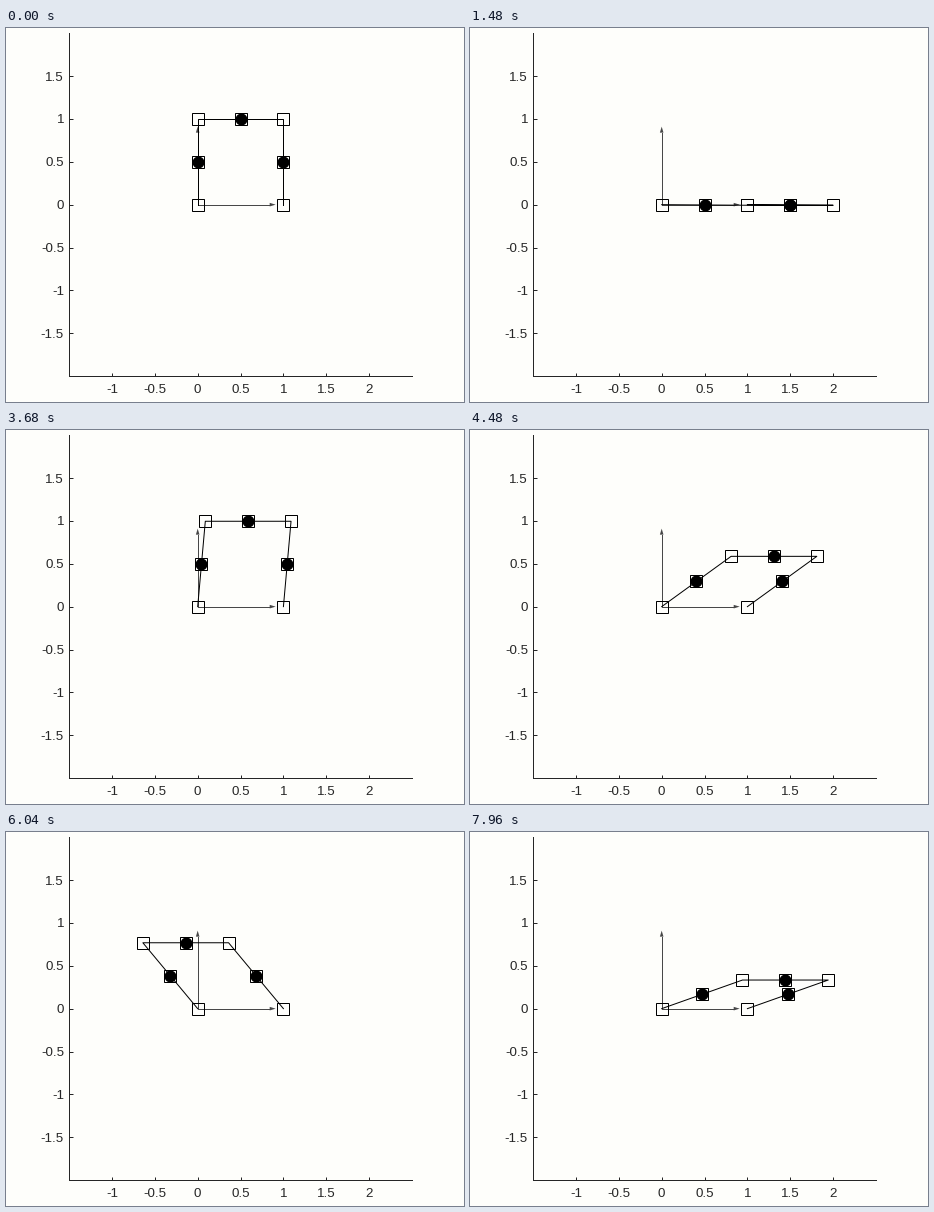
Recreate the animation shown at these times as a matplotlib script. Size 458 by 374 pixels, loop 8 s.

```python
import numpy as np
import matplotlib.pyplot as plt
from matplotlib.animation import FuncAnimation

WIDTH, HEIGHT, DPI = 458, 374, 64
PX = 72 / DPI                      # one pixel in points
FRAMES, INTERVAL = 200, 40
LEFT, RIGHT, TOP, BOTTOM = 63.1, 406, 5.2, 348.1
UNIT = (RIGHT - LEFT) / 4          # pixels per data unit
PAPER, INK, AXIS, ARROW = "#fefefb", "#000000", "#262626", "#484848"
HOLD = 196                         # the picture pauses for one step here

# Pose checkpoints: swing angle in degrees, clockwise from upright
KEY_FRAMES = [7, 37, 65, 92, 131, 173, 199]
KEY_ANGLES = [0, 90.4, 306.9, 365.1, 552.7, 722.7, 790.5]


def swing(duration=16.5, step=0.002, speed=0.3):
    """Inverted pendulum in natural time units, pushed off from the top."""
    times = np.arange(0, duration, step)
    angles = np.zeros_like(times)
    for i in range(1, len(times)):
        half = speed + 0.5 * step * np.sin(angles[i - 1])
        angles[i] = angles[i - 1] + step * half
        speed = half + 0.5 * step * np.sin(angles[i])
    return times, angles


times, angles = swing()
key_times = np.interp(np.radians(KEY_ANGLES), angles, times)


def angle_at(frame):
    if frame == HOLD:
        frame -= 1
    return np.interp(np.interp(frame, KEY_FRAMES, key_times), times, angles)


plt.rcParams["font.family"] = "Liberation Sans"
plt.rcParams["axes.unicode_minus"] = False

fig = plt.figure(figsize=(WIDTH / DPI, HEIGHT / DPI), dpi=DPI, facecolor=PAPER)
ax = fig.add_axes([LEFT / WIDTH, 1 - BOTTOM / HEIGHT,
                   (RIGHT - LEFT) / WIDTH, (BOTTOM - TOP) / HEIGHT])
ax.set(xlim=(-1.5, 2.5), ylim=(-2, 2), facecolor="none")
x_ticks, y_ticks = np.arange(-1, 2.1, 0.5), np.arange(-1.5, 1.6, 0.5)
ax.set_xticks(x_ticks, [f"{v:g}" for v in x_ticks])
ax.set_yticks(y_ticks, [f"{v:g}" for v in y_ticks])
ax.tick_params(direction="in", length=3.5 * PX, width=PX, color=AXIS,
               labelcolor=AXIS, labelsize=13.33 * PX)
ax.tick_params(axis="x", pad=8 * PX)
ax.tick_params(axis="y", pad=5 * PX)
for side, spine in ax.spines.items():
    spine.set(visible=side in ("left", "bottom"), linewidth=PX, color=AXIS)


def draw_arrow(direction):
    """Unit-axis arrow from the origin with a small solid head."""
    along = np.array(direction)
    across = along[::-1]
    tip = 0.91 * along
    base = tip - 6 / UNIT * along
    ax.plot(*zip((0, 0), base), color=ARROW, lw=PX, zorder=2)
    wing = 1.8 / UNIT * across
    ax.fill(*zip(tip, base + wing, base - wing), color=ARROW, lw=0, zorder=2)


draw_arrow((1.0, 0.0))
draw_arrow((0.0, 1.0))

links, = ax.plot([], [], color=INK, lw=PX, zorder=3)
squares, = ax.plot([], [], "s", ms=12 * PX, mfc="none", mec=INK, mew=PX,
                   zorder=4)
masses, = ax.plot([], [], "o", ms=12 * PX, color=INK, mew=0, zorder=5)


def update(frame):
    phi = angle_at(frame)
    arm = np.array([np.sin(phi), np.cos(phi)])
    base = np.array([1.0, 0.0])
    joints = np.array([0 * base, arm, arm + base, base])
    middles = (joints[:-1] + joints[1:]) / 2
    links.set_data(*joints.T)
    squares.set_data(*np.vstack([joints, middles]).T)
    masses.set_data(*middles.T)
    return links, squares, masses


anim = FuncAnimation(fig, update, frames=FRAMES, interval=INTERVAL,
                     repeat=True, repeat_delay=0)
plt.show()
```
